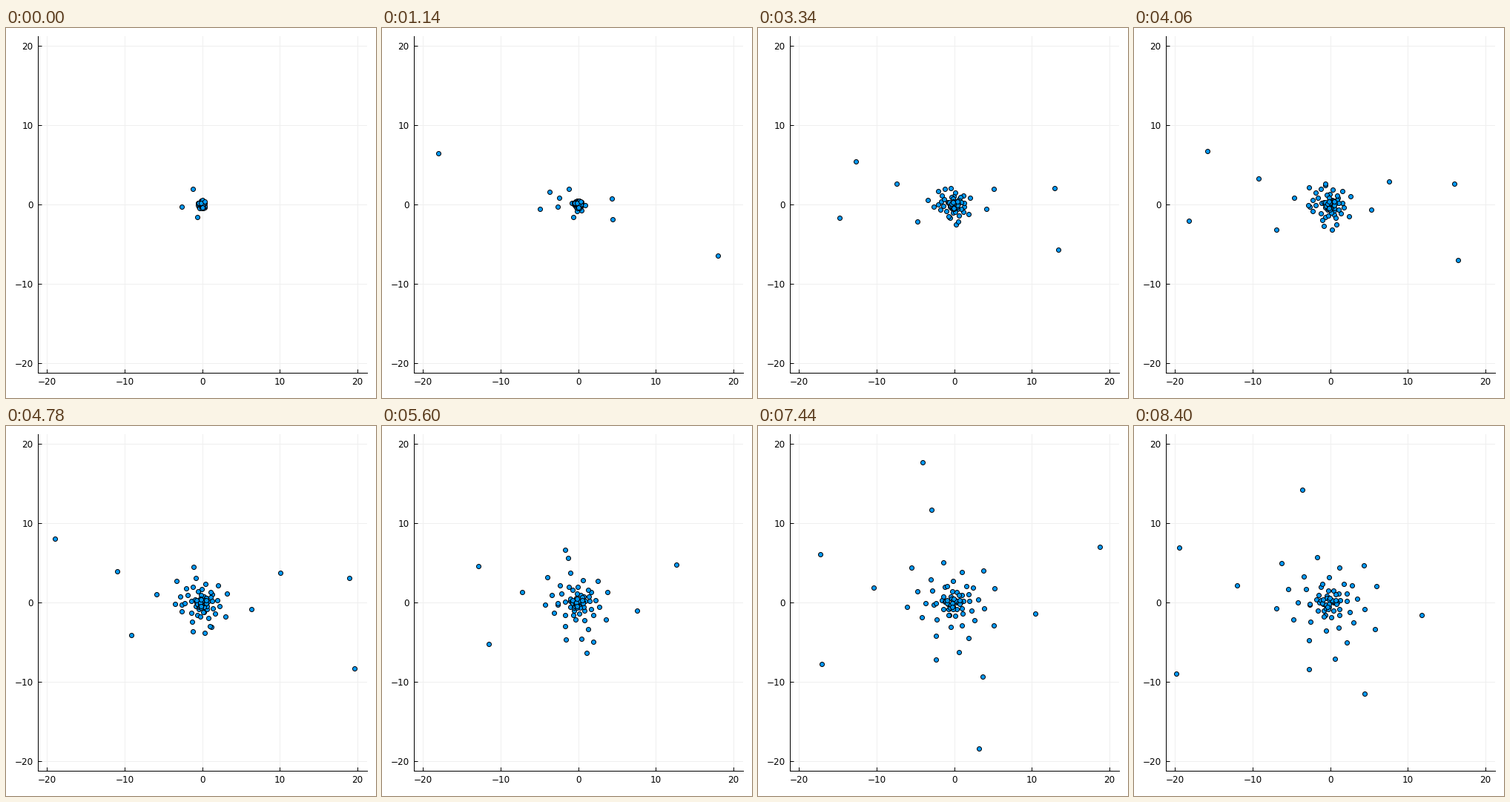
Recreate the animation shown at these times as a matplotlib script. Size 499 px wide and 499 px high, loop 8420 ms.

```python
import numpy as np
import matplotlib.pyplot as plt
from matplotlib.animation import FuncAnimation

SIZE, DPI = 499, 100
PX = 72 / DPI
LOOP, TICK = 8420, 20
LIM = 21.2
GOLDEN = np.pi * (3 - 5 ** .5)

# bodies flung far out of the core: release step, velocity per step
FLUNG = np.array([
    (5, -.1955, .0832), (1, .194, -.0826), (1, .188, .0303), (1, -.215, -.0245),
    (36.5, .153, .0575), (36, -.1385, -.063), (2, -.1098, .0389),
    (98, .052, -.3025), (100.3, -.069, .301), (67, -.0322, .127),
    (74, .0425, -.11), (12, .0708, -.0095), (27, -.0788, .0138),
    (43, -.0205, -.0622),
])
# pairs of very fast bodies thrown opposite ways at once
PAIRS = np.array([(-17, 9.75), (-.75, .27)])
RESTING = np.array([(-2.68, -.3), (-1.26, 1.92), (-.63, -1.57)])

# the rest: a swarm around the core, its speeds falling off exponentially
SWARM = 68
rng = np.random.default_rng(7)
rank = np.arange(SWARM)
speed = .052 * np.exp(-rank / 22)
angle = rank * GOLDEN + 2.4
home = np.clip(rng.normal(0, .24, (SWARM, 2)), -.55, .6)
swarm_vel = speed[:, None] * np.column_stack([np.cos(angle), .85 * np.sin(angle)])
swarm_start = rng.uniform(0, 30, SWARM)


def step_at(ms):
    """Steps come in threes, held for 20, 20 and 100 ms."""
    if ms < 120:
        return 0
    trio, rest = divmod(ms - 120, 140)
    return 1 + 3 * trio + min(rest // 20, 2)


def travel(n, start, vel):
    return vel * np.maximum(0, n - start)[:, None]


def bodies(n):
    return np.vstack([
        RESTING, PAIRS * n, -PAIRS * n,
        travel(n, FLUNG[:, 0], FLUNG[:, 1:]),
        home + travel(n, swarm_start, swarm_vel),
    ])


plt.rcParams["font.family"] = "DejaVu Sans"
fig = plt.figure(figsize=(SIZE / DPI, SIZE / DPI), dpi=DPI, facecolor="white")
left, right, top, bottom = 42.9, 486.6, 11.1, 464.7
ax = fig.add_axes([left / SIZE, 1 - bottom / SIZE,
                   (right - left) / SIZE, (bottom - top) / SIZE])
ax.set(xlim=(-LIM, LIM), ylim=(-LIM, LIM))
ticks = range(-20, 21, 10)
ax.set_xticks(ticks)
ax.set_yticks(ticks)
ax.tick_params(direction="in", length=5 * PX, width=PX, pad=6.5 * PX,
               labelsize=12 * PX)
ax.set_axisbelow(True)
ax.grid(color="#efefef", linewidth=PX)
ax.spines[["top", "right"]].set_visible(False)
ax.spines[["left", "bottom"]].set_linewidth(PX)

dots, = ax.plot([], [], "o", color="#009afa", markeredgecolor="black",
                markersize=6 * PX, markeredgewidth=PX)


def draw(i):
    dots.set_data(*bodies(step_at(i * TICK)).T)
    return dots,


anim = FuncAnimation(fig, draw, frames=LOOP // TICK, interval=TICK,
                     repeat=True, repeat_delay=0, blit=False)
plt.show()
```
